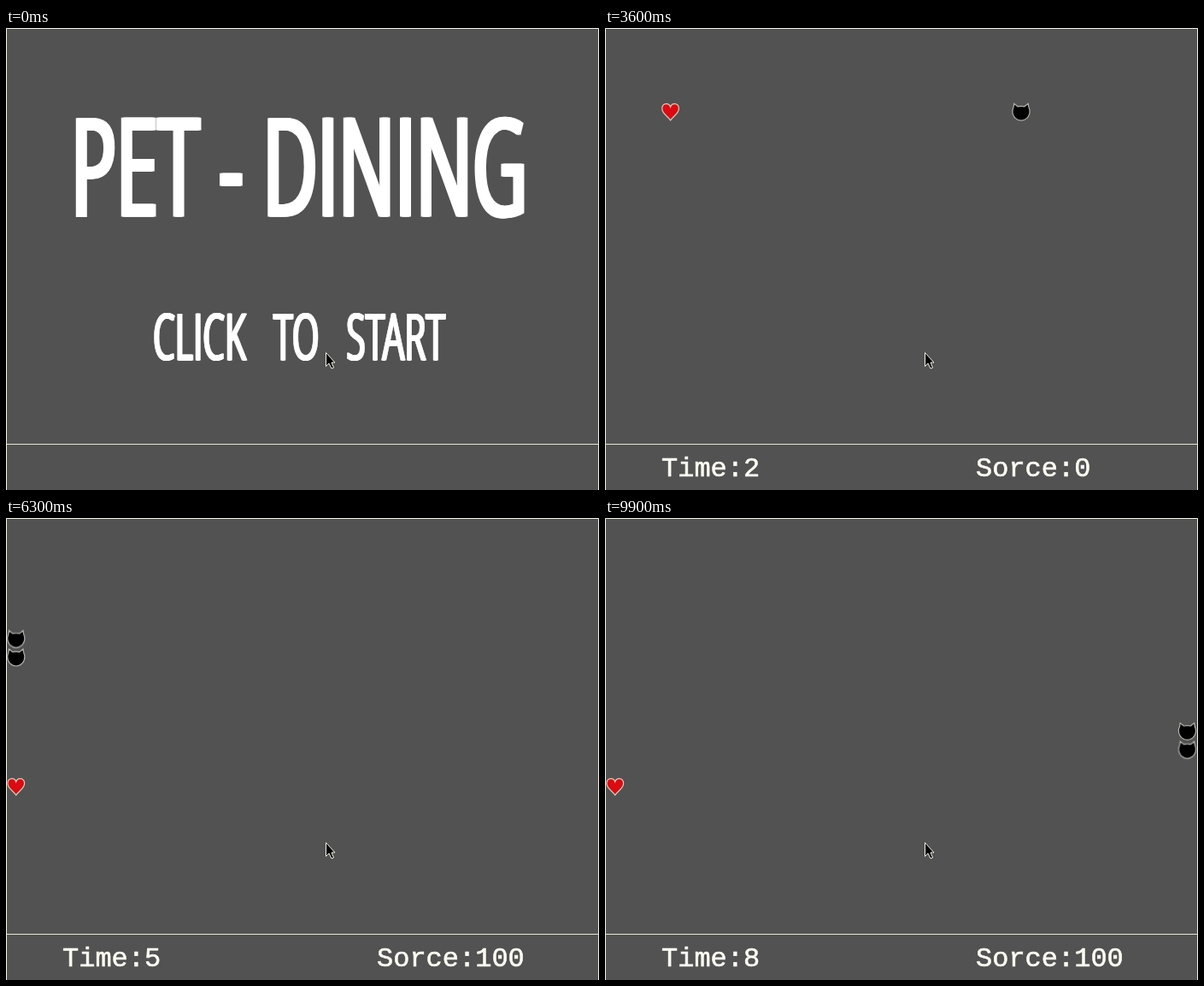
Animation of 694x540 px, one loop 10000 ms. Source, as an HTML page without scripts:

```html
<!DOCTYPE html>
<html lang="en">
<head>
<meta charset="utf-8">
<title>Pet game</title>
<style>
  html, body { margin: 0; width: 100%; height: 100%; overflow: hidden; background: #525252; }
  svg { display: block; }
  .stage { width: 694px; height: 540px; }

  .big { font-family: "Open Sans", "Noto Sans", sans-serif; fill: #fff; stroke: #fff; text-anchor: middle; white-space: pre; }
  .name { stroke-width: 3px; filter: drop-shadow(2px 0 0 #fff) drop-shadow(-2px 0 0 #fff); }
  .hint { stroke-width: 1px; filter: drop-shadow(1px 0 0 #fff) drop-shadow(-1px 0 0 #fff); }
  .info { font: 32px "Liberation Mono", "Courier New", monospace; fill: #fffff4; stroke: #fffff4; stroke-width: .6px; }

  /* one board cell is 1em */
  .board { font-size: 21.6px; }

  .intro, .game, .head, .tail, .heart, .digits, .low, .high {
    animation: 10s step-end -10ms infinite;
  }
  .intro { animation-name: intro; }
  .game { animation-name: game; }
  .head { animation-name: head; }
  .tail { animation-name: tail, grown; }
  .heart { animation-name: heart; }
  .digits { animation-name: count; }
  .low { animation-name: low; }
  .high { animation-name: high; }

  @keyframes intro { 0% { opacity: 1 } 13%, 100% { opacity: 0 } }
  @keyframes game { 0% { opacity: 0 } 13%, 100% { opacity: 1 } }
  @keyframes low { 0% { opacity: 1 } 56%, 100% { opacity: 0 } }
  @keyframes high { 0% { opacity: 0 } 56%, 100% { opacity: 1 } }
  @keyframes grown { 0% { opacity: 0 } 57%, 100% { opacity: 1 } }
  @keyframes heart { 0% { translate: 3em 4em } 56%, 100% { translate: 0 14em } }
  @keyframes count {
    0% { translate: 0 0 }
    13% { translate: 0 0; animation-timing-function: steps(8) }
    93%, 100% { translate: 0 -320px }
  }

  /* one cell every 100 ms, with a short hold now and then */
  @keyframes head {
    0% { translate: 9em 8em }
    13% { translate: 9em 8em; animation-timing-function: steps(9) }
    22% { translate: 18em 8em }
    23% { translate: 18em 8em; animation-timing-function: steps(6) }
    29% { translate: 24em 8em; animation-timing-function: steps(4) }
    33% { translate: 24em 4em }
    34% { translate: 23em 4em }
    35% { translate: 23em 4em; animation-timing-function: steps(7) }
    42% { translate: 16em 4em }
    43% { translate: 16em 4em; animation-timing-function: steps(16) }
    59% { translate: 0 4em; animation-timing-function: steps(3) }
    62% { translate: 0 7em }
    63% { translate: 0 7em }
    64% { translate: 0 8em; animation-timing-function: steps(6) }
    70% { translate: 6em 8em; animation-timing-function: steps(5) }
    75% { translate: 6em 13em; animation-timing-function: steps(5) }
    80% { translate: 1em 13em; animation-timing-function: steps(5) }
    85% { translate: 1em 8em; animation-timing-function: steps(3) }
    88% { translate: 4em 8em; animation-timing-function: steps(4) }
    92% { translate: 4em 12em }
    93% { translate: 4em 12em; animation-timing-function: steps(4) }
    97% { translate: 0 12em }
    98% { translate: 31em 12em }
    99%, 100% { translate: 31em 11em }
  }
  @keyframes tail {
    0% { translate: 3em 4em }
    57% { translate: 3em 4em; animation-timing-function: steps(3) }
    60% { translate: 0 4em; animation-timing-function: steps(2) }
    62% { translate: 0 6em }
    63% { translate: 0 6em; animation-timing-function: steps(2) }
    65% { translate: 0 8em; animation-timing-function: steps(6) }
    71% { translate: 6em 8em; animation-timing-function: steps(5) }
    76% { translate: 6em 13em; animation-timing-function: steps(5) }
    81% { translate: 1em 13em; animation-timing-function: steps(5) }
    86% { translate: 1em 8em; animation-timing-function: steps(3) }
    89% { translate: 4em 8em; animation-timing-function: steps(3) }
    92% { translate: 4em 11em }
    93% { translate: 4em 11em }
    94% { translate: 4em 12em; animation-timing-function: steps(4) }
    98% { translate: 0 12em }
    99%, 100% { translate: 31em 12em }
  }
</style>
</head>
<body>
<svg class="stage" viewBox="0 0 694 540">
  <defs>
    <path id="cat" d="M2.6 1L6.8 4.4Q10.8 3.6 14.8 4.4L19 1Q19.4 5 20.8 8.5Q21.4 14 17.6 18Q14.5 20.8 10.8 20.8Q7 20.8 4 18Q.2 14 .8 8.5Q2.2 5 2.6 1Z" fill="#000" stroke="#b4b4ac" stroke-width="1.2"/>
  </defs>

  <rect width="694" height="540" fill="#525252"/>
  <path d="M.5 540V.5H693.5V540" fill="none" stroke="#f4f4e6"/>
  <path d="M0 486.5H694" stroke="#e6e6d0"/>

  <g class="intro">
    <g class="name">
      <text class="big" transform="translate(343 219) scale(.56 1)" font-size="157">PET - DINING</text>
    </g>
    <g class="hint">
      <text class="big" transform="translate(343 388) scale(.54 1)" font-size="75.6">CLICK   TO   START</text>
    </g>
  </g>

  <g class="game">
    <g class="board" transform="translate(1 1)">
      <path class="heart" d="M10.8 20.5C8 16 1 12.5 1 7C1 0 9-.5 10.8 5C12.6-.5 20.6 0 20.6 7C20.6 12.5 13.6 16 10.8 20.5Z" fill="#dc0a12" stroke="#d8ccb8" stroke-width="1.2"/>
      <g class="tail"><use href="#cat"/></g>
      <g class="head"><use href="#cat"/></g>
    </g>

    <g class="info">
      <text x="66" y="524">Time:</text>
      <svg x="162" y="495" width="22" height="40" overflow="hidden">
        <g class="digits">
          <text y="29">0</text>
          <text y="69">1</text>
          <text y="109">2</text>
          <text y="149">3</text>
          <text y="189">4</text>
          <text y="229">5</text>
          <text y="269">6</text>
          <text y="309">7</text>
          <text y="349">8</text>
        </g>
      </svg>
      <text x="434" y="524">Sorce:</text>
      <text class="low" x="549.2" y="524">0</text>
      <text class="high" x="549.2" y="524">100</text>
    </g>
  </g>

  <path d="M374.5 379.5V395.5L378 392L381 398L383.5 397L381 391H385Z" fill="#000" stroke="#f4f4e6"/>
</svg>
</body>
</html>
```
